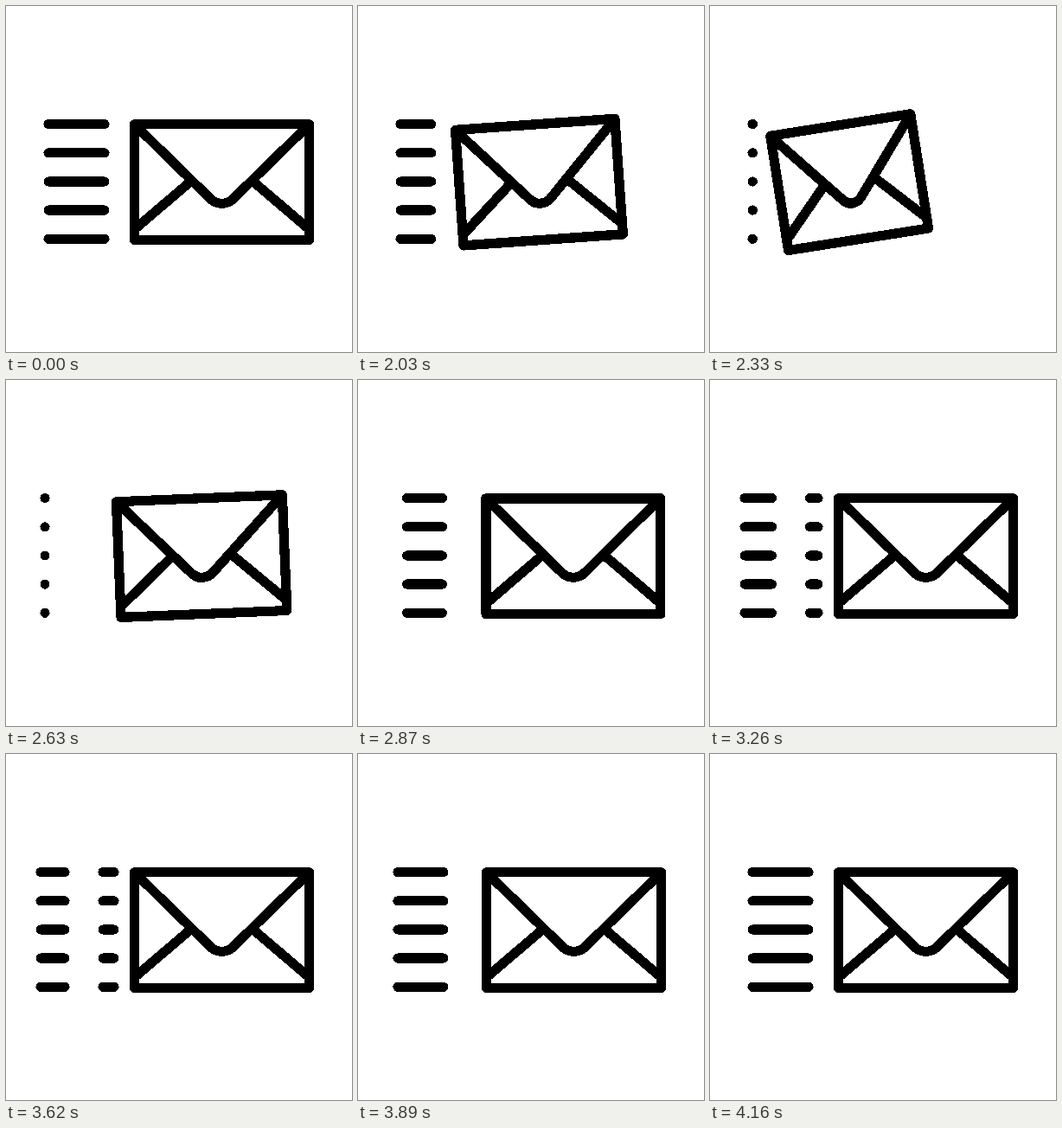
An HTML page with a canvas for the animation above (4220 ms loop, 400x400 px).

```html
<!DOCTYPE html>
<html lang="en">
<head>
<meta charset="utf-8">
<title>Sending mail</title>
<style>
  html, body { margin: 0; width: 100%; height: 100%; overflow: hidden; background: #fff; }
  canvas { display: block; width: 400px; height: 400px; }
</style>
</head>
<body>
<canvas id="stage" width="400" height="400"></canvas>
<script>
const ctx = document.getElementById('stage').getContext('2d', { willReadFrequently: true });
const SIZE = 400, LOOP = 4220, HOLD = 2000, STEP = 30, LAST = 72;
const RELEASE = 18;               // step at which the envelope is let go
const TRACK = { left: 40, size: 85 };
const CENTER = { x: 249.5, y: 203.6 };

// Keys are [step, value, slope]
const DASH_START = [[0, 49, 0], [18, 49, 0], [21, 45, 0], [29, 56.5, 3.5], [42, 115.5, 6], [54, 197, 3.5], [72, 219, 0]];
const DASH_SIZE = [[21, 0, 0], [29, 41, 0], [54, 41, 0], [72, 65, 0]];

function hermite(keys, n) {
  let i = 0;
  while (i < keys.length - 2 && n > keys[i + 1][0]) i++;
  const [n0, v0, s0] = keys[i], [n1, v1, s1] = keys[i + 1];
  const d = n1 - n0, u = (n - n0) / d, w = 1 - u;
  return v0 * (1 + 2 * u) * w * w + v1 * u * u * (3 - 2 * u)
       + d * (s0 * u * w * w - s1 * u * u * w);
}

// 0 at rest, 1 when fully drawn back
function pull(n) {
  if (n < 1) return 0;
  if (n <= RELEASE) return 1 - 0.55 * Math.pow(0.65, n - 1);
  return Math.pow(0.64, n - RELEASE);
}

function dashSize(n) {
  if (n <= RELEASE) return 65 * (1 - pull(n));
  return n < 21 ? 0 : hermite(DASH_SIZE, n);
}

function segment(x0, x1, y) {
  ctx.beginPath();
  ctx.moveTo(x0, y);
  ctx.lineTo(Math.max(x1, x0 + 0.01), y);
  ctx.stroke();
}

function drawDashes(n) {
  const end = TRACK.left + TRACK.size;
  const a = TRACK.left + (hermite(DASH_START, n) - TRACK.left) % TRACK.size;
  const b = a + dashSize(n);
  ctx.lineWidth = 10.5;
  for (let i = 0; i < 5; i++) {
    const y = 136.5 + 33.2 * i;
    segment(a, Math.min(b, end), y);
    if (b > end) segment(TRACK.left, b - TRACK.size, y);
  }
}

function drawEnvelope(p) {
  // Only the path is transformed, so the line weight stays even
  ctx.save();
  ctx.translate(CENTER.x - 89 * p, CENTER.y);
  ctx.rotate(-9 * p * Math.PI / 180);
  ctx.scale(1 - 0.19 * p, 1);
  ctx.translate(-CENTER.x, -CENTER.y);
  ctx.beginPath();
  ctx.rect(148.45, 136.75, 202.05, 133.75);
  ctx.moveTo(149.5, 138);
  ctx.lineTo(235, 221.5);
  ctx.bezierCurveTo(243, 230.5, 256, 230.5, 264, 221.5);
  ctx.lineTo(349.5, 138);
  ctx.moveTo(150, 257);
  ctx.lineTo(212, 204);
  ctx.moveTo(349, 257);
  ctx.lineTo(287, 204);
  ctx.restore();
  ctx.lineWidth = 10.7;
  ctx.stroke();
}

// Pure black and white, without soft edges
function harden() {
  const image = ctx.getImageData(0, 0, SIZE, SIZE);
  const d = image.data;
  for (let i = 0; i < d.length; i += 4) {
    d[i] = d[i + 1] = d[i + 2] = d[i] < 204 ? 0 : 255;
  }
  ctx.putImageData(image, 0, 0);
}

function draw(n) {
  ctx.fillStyle = '#fff';
  ctx.fillRect(0, 0, SIZE, SIZE);
  ctx.strokeStyle = '#000';
  ctx.lineCap = ctx.lineJoin = 'round';
  drawDashes(n);
  drawEnvelope(pull(n));
  harden();
}

let begin = null;
function tick(now) {
  if (begin === null) begin = now;
  const t = (now - begin) % LOOP;
  draw(Math.min(LAST, Math.max(0, Math.floor((t - HOLD) / STEP))));
  requestAnimationFrame(tick);
}
draw(0);
requestAnimationFrame(tick);
</script>
</body>
</html>
```
